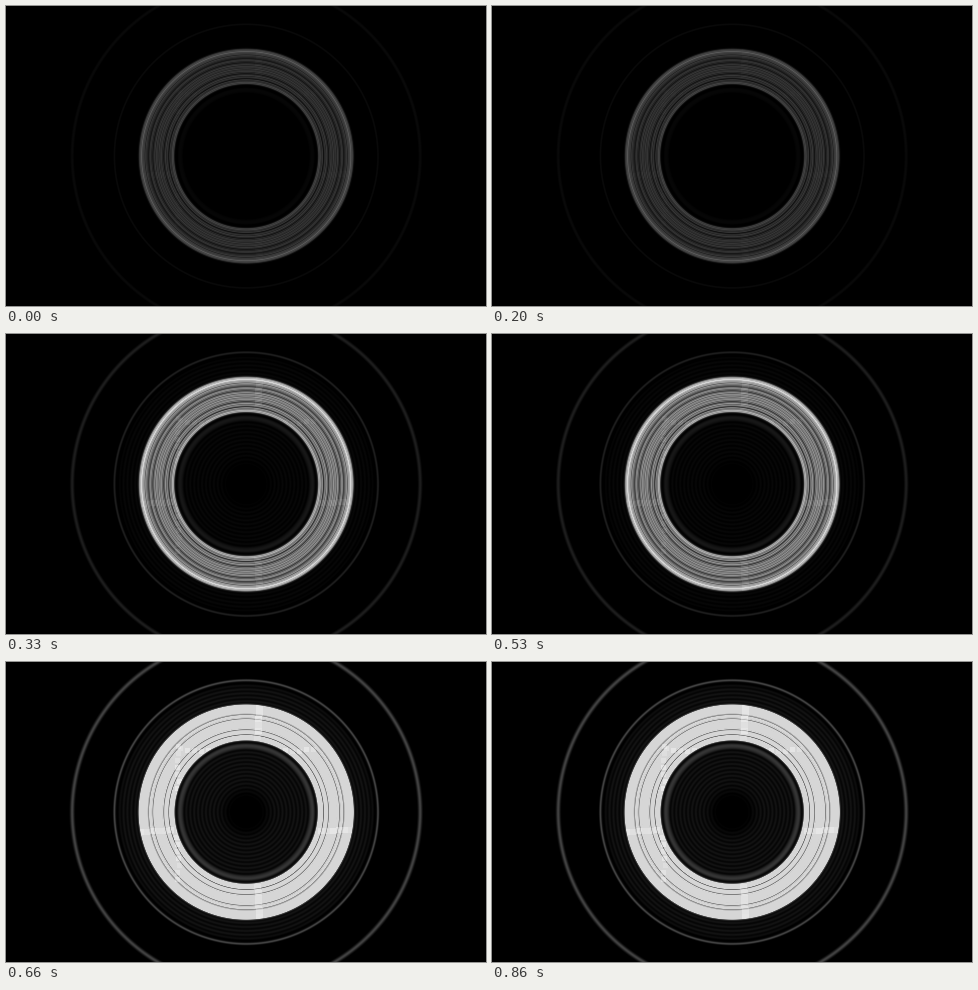
These frames come from a looping animation (480x300 px, 0.99 s). An HTML page with a canvas:

```html
<!DOCTYPE html>
<html>
<head>
<meta charset="utf-8">
<style>
html, body { margin: 0; height: 100%; overflow: hidden; background: #000; }
canvas { display: block; }
</style>
</head>
<body>
<canvas id="stage" width="480" height="300"></canvas>
<script>
const W = 480, H = 300, CX = 240.2, CY = 150.1, STEP = 330;
const INNER = 72, OUTER = 107.5, WHITE = 214, BLACK = 4;
const exposures = [0.85, 2.2, 4.6];
const ctx = document.getElementById('stage').getContext('2d');

const bump = (r, at, width) => Math.exp(-(((r - at) / width) ** 2));
const edge = x => 1 / (1 + Math.exp(-x * 2.2));

// Brightness of the rings at radius r, before exposure
function light(r) {
  const band = edge(r - INNER) * edge(OUTER - r);
  const grain = 1 + 0.12 * Math.sin(r * 2.9) + 0.08 * Math.sin(r * 4.7);
  let gaps = 1;
  for (const at of [77.5, 82.5, 93.5, 97.8]) gaps -= 0.5 * bump(r, at, 0.8);
  const rims = 32 * bump(r, 72.8, 1.3) + 40 * bump(r, 104.8, 2);
  const faint = 15 * bump(r, 174, 2) + 15 * bump(r, 131.8, 1.2) + 10 * bump(r, 66, 2);
  const haze = 3.5 * edge((r - 20) / 8) * edge((128 - r) / 3) * (1 + 0.4 * Math.sin(r * 1.6));
  return band * (58 * grain * gaps + rims) + faint + haze * (1 - band);
}

const field = Float32Array.from({ length: W * H }, (_, i) =>
  light(Math.hypot(i % W + 0.5 - CX, Math.floor(i / W) + 0.5 - CY)));

// Brighter tiles: four arms across the band, and a broken row and column
function drawTiles(alpha) {
  let seed = 71;
  const random = () => (seed = seed * 16807 % 2147483647) / 2147483647;
  const tile = (x, y, w, h) => {
    ctx.fillStyle = `rgba(255,255,255,${alpha * (0.4 + 0.6 * random())})`;
    ctx.fillRect(Math.round(x), Math.round(y), w, h);
  };
  ctx.save();
  ctx.beginPath();
  ctx.arc(CX, CY, OUTER, 0, 2 * Math.PI);
  ctx.arc(CX, CY, INNER, 0, 2 * Math.PI, true);
  ctx.clip();
  for (let d = INNER; d < OUTER; d += 6) {
    const shift = (d - INNER) / 14;
    tile(CX + 8 + shift, CY - d - 6, 7, 6);
    tile(CX + 8 + shift, CY + d, 7, 6);
    tile(CX - d - 6, CY + 15 + shift, 6, 6);
    tile(CX + d, CY + 16 - shift / 2, 6, 6);
  }
  for (let d = -68; d < 68; d += 7) {
    tile(CX + d, CY - 66 + random() * 3, 5, 5);
    tile(CX - 72 + random() * 3, CY + d, 5, 5);
  }
  ctx.restore();
}

function draw(level) {
  const gain = exposures[level];
  const image = ctx.createImageData(W, H);
  field.forEach((value, i) => {
    const grey = Math.min(WHITE, value * gain - BLACK);
    image.data.set([grey, grey, grey, 255], i * 4);
  });
  ctx.putImageData(image, 0, 0);
  drawTiles(0.02 * gain * gain);
}

const start = performance.now();
let shown = -1;
function tick() {
  const level = Math.floor((performance.now() - start) / STEP) % exposures.length;
  if (level !== shown) draw(shown = level);
  requestAnimationFrame(tick);
}
tick();
</script>
</body>
</html>
```
